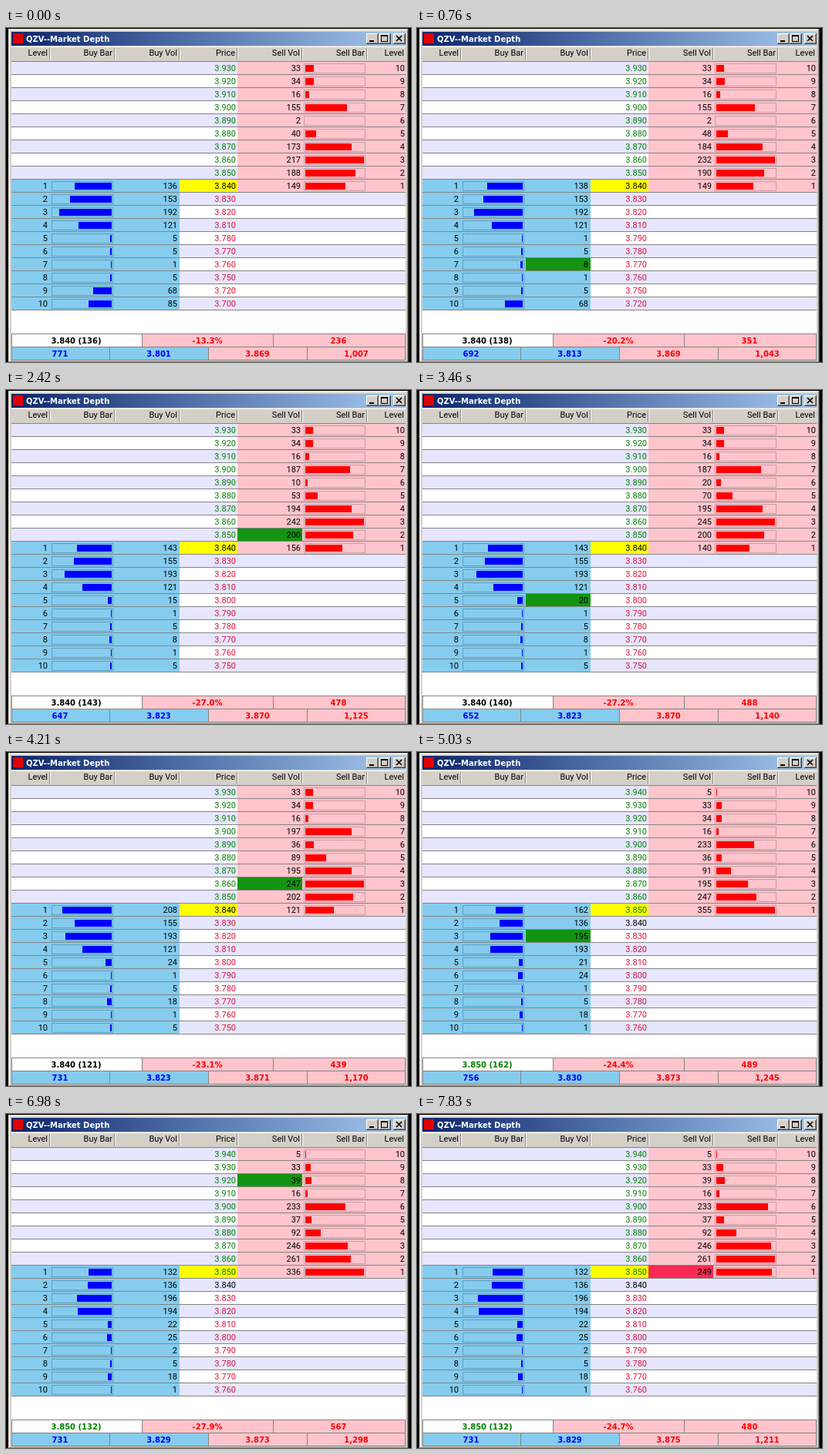
Recreate the animation shown at these times as an HTML page with a canvas. Size 525x434 px, loop 8 s.

```html
<!DOCTYPE html>
<html lang="en">
<head>
<meta charset="utf-8">
<title>Market Depth</title>
<style>
html, body { margin: 0; width: 100%; height: 100%; overflow: hidden; background: #000; }
canvas { display: block; }
</style>
</head>
<body>
<canvas id="stage" width="525" height="434"></canvas>
<script>
const ctx = document.getElementById('stage').getContext('2d');
const LOOP = 8000, FLASH = 460, LEVELS = 10, CLOSE = 384, BAR = 76;
const PINK = '#ffc4cc', SKY = '#85ccee', LAVENDER = '#e6e6ff', FACE = '#d4d0c8', RULE = '#848484';
const PLAIN = '11px Roboto, sans-serif';
const BOLD = 'bold 10px "DejaVu Sans", sans-serif';

// Prices are in cents; s = sell side, b = buy side.
const opening = { s: {}, b: {} };
[149, 188, 217, 173, 40, 2, 155, 16, 34, 33, 5].forEach((vol, i) => opening.s[384 + i] = vol);
[136, 153, 192, 121].forEach((vol, i) => opening.b[384 - i] = vol);
Object.assign(opening.b, { 378: 5, 377: 5, 376: 1, 375: 5, 372: 68, 370: 85 });

// Each burst spreads its steps evenly over a time span; "-" only clears the highlight.
const events = [];
function burst(from, to, steps) {
  const list = steps.split(' ');
  list.forEach((step, i) => events.push({
    time: from + (to - from) * i / Math.max(1, list.length - 1),
    orders: step === '-' ? [] : step.split(',').map(order => {
      const [key, vol] = order.split('=');
      return { side: key[0], price: +key.slice(1), vol: +vol };
    })
  }));
}
burst(60, 430, 's386=225 s387=184 s388=48 s385=190 b384=138 s386=232');
burst(630, 1010, 'b379=1 b377=8 s390=170 s384=151 s390=185');
burst(1210, 1460, 's389=10 b384=140 -');
burst(1590, 1970, 's386=242 s390=187 b380=15 s387=194 b384=143 s384=156');
burst(2100, 2100, 's388=53');
burst(2300, 2480, 'b382=193 b383=155 s385=200 s387=195');
burst(2680, 2940, 's388=70 s386=245 s384=140');
burst(3340, 4090, 's389=20 b380=20 s390=197 s388=89 b384=170 s389=36 b377=18 s385=202 b384=208 b380=24');
burst(4150, 4270, 's384=121 s386=247 s390=233');
burst(4360, 4840, 's388=91 b383=190 s384=0,b384=140,s385=340,b385=150 s385=355 b381=21 b385=162');
burst(4970, 5030, 'b384=136 b383=195');
burst(5490, 5550, 's385=365 s387=245');
burst(5880, 5880, 's385=380');
burst(6210, 6210, 'b383=196,b382=194,b381=22,b380=25,b379=2,s389=37,s388=92,s387=246,s386=248,s385=381');
burst(6470, 6590, 's386=261 s385=340 s385=336');
burst(6790, 7110, 'b385=132 s392=39 s385=300 s385=279');
burst(7830, 7830, 's385=249');

function bookAt(time) {
  const book = { s: { ...opening.s }, b: { ...opening.b } };
  let flash = null;
  for (const event of events) {
    if (event.time > time + 0.01) break;
    flash = null;
    for (const { side, price, vol } of event.orders) {
      const up = vol > (book[side][price] || 0);
      book[side][price] = vol;
      if (time < event.time + FLASH) flash = { side, price, color: up ? '#129412' : '#fa2a54' };
    }
  }
  const top = (side, dir) => Object.entries(book[side])
    .map(([price, vol]) => ({ price: +price, vol }))
    .filter(level => level.vol)
    .sort((a, b) => dir * (a.price - b.price))
    .slice(0, LEVELS);
  return { sells: top('s', 1), buys: top('b', -1), flash };
}

function box(x, y, w, h, color) {
  ctx.fillStyle = color;
  ctx.fillRect(x, y, w, h);
}
function outline(x, y, w, h, color) {
  ctx.strokeStyle = color;
  ctx.strokeRect(x + 0.5, y + 0.5, w - 1, h - 1);
}
function text(str, x, y, color = '#000', align = 'right', font = PLAIN) {
  ctx.font = font;
  ctx.textAlign = align;
  ctx.fillStyle = color;
  ctx.fillText(str, x, y);
}
const money = cents => (cents / 100).toFixed(3);
const priceColor = price => price > CLOSE ? '#008000' : price < CLOSE ? '#dc143c' : '#000';
const sum = (list, value) => list.reduce((total, item) => total + value(item), 0);

function drawButton(x) {
  box(x, 7, 16, 14, '#404040');
  box(x, 7, 15, 13, '#fff');
  box(x + 1, 8, 14, 12, RULE);
  box(x + 1, 8, 13, 11, FACE);
}

function drawWindow() {
  box(0, 0, 525, 434, '#000');
  box(3, 1, 519, 433, '#404040');
  box(3, 1, 518, 433, FACE);
  box(4, 2, 517, 432, RULE);
  box(4, 2, 516, 431, '#fff');
  box(5, 3, 515, 430, FACE);
  const title = ctx.createLinearGradient(7, 0, 518, 0);
  title.addColorStop(0, '#0a246a');
  title.addColorStop(1, '#a6caf0');
  box(7, 5, 511, 18, title);
  box(9, 7, 13, 13, '#e00000');
  text('QZV--Market Depth', 26, 18, '#fff', 'left', BOLD);

  [467, 483, 502].forEach(drawButton);
  box(471, 16, 6, 2, '#000');
  outline(486, 9, 9, 9, '#000');
  box(486, 9, 9, 2, '#000');
  ctx.strokeStyle = '#000';
  ctx.lineWidth = 1.6;
  ctx.beginPath();
  ctx.moveTo(506, 10); ctx.lineTo(513, 17);
  ctx.moveTo(513, 10); ctx.lineTo(506, 17);
  ctx.stroke();
  ctx.lineWidth = 1;

  box(7, 24, 511, 1, '#fff');
  [['Level', 57], ['Buy Bar', 141], ['Buy Vol', 225], ['Price', 300],
   ['Sell Vol', 384], ['Sell Bar', 468], ['Level', 519]].forEach(([label, edge]) => {
    text(label, edge - 3, 36);
    if (edge < 518) {
      box(edge - 1, 26, 1, 15, RULE);
      box(edge, 26, 1, 15, '#fff');
    }
  });
  box(7, 43, 511, 1, RULE);
  box(7, 44, 511, 353, '#fff');
}

function drawRow(row, { sells, buys, flash }, max) {
  const y = 44 + 17 * row, base = y + 12;
  const sell = sells[LEVELS - 1 - row], buy = buys[row - LEVELS + 1];
  const { price } = sell || buy;
  const lit = (side, x, w) => {
    if (flash && flash.side === side && flash.price === price) box(x, y, w, 16, flash.color);
  };
  box(7, y, 511, 16, row % 2 ? '#fff' : LAVENDER);
  if (buy) {
    box(7, y, 218, 16, SKY);
    lit('b', 141, 84);
    const w = Math.ceil(buy.vol / max * BAR);
    outline(59, y + 2, 80, 13, '#5c9fc4');
    box(137 - w, y + 4, w, 9, '#00f');
    text(row - LEVELS + 2, 54, base);
    text(buy.vol, 222, base);
  }
  if (sell) {
    box(300, y, 218, 16, PINK);
    lit('s', 300, 84);
    outline(386, y + 2, 80, 13, '#cf9aa2');
    box(388, y + 4, Math.floor(sell.vol / max * BAR), 9, '#f00');
    text(sell.vol, 382, base);
    text(LEVELS - row, 517, base);
  }
  if (buy && sell) box(225, y, 75, 16, '#ff0');
  text(money(price), 298, base, priceColor(price));
  box(7, y + 16, 511, 1, RULE);
}

function drawFooter({ sells, buys }) {
  const bought = sum(buys, l => l.vol), sold = sum(sells, l => l.vol);
  const average = (side, total) => money(sum(side, l => l.price * l.vol) / total);
  const price = buys[0].price;
  const matched = Math.min(buys[0].vol, sells[0].vol);
  const percent = (100 * (bought - sold) / (bought + sold)).toFixed(1) + '%';
  const cells = (y, width, list) => list.forEach(([label, color, fill], i) => {
    const x = 6 + width * i;
    box(x + 1, y + 1, 517 - x, 16, fill);
    if (i) box(x, y, 1, 17, RULE);
    text(label, x + width / 2, y + 13, color, 'center', BOLD);
  });
  cells(397, 170, [
    [`${money(price)} (${matched})`, priceColor(price), '#fff'],
    [percent, '#f00', PINK],
    [Math.abs(bought - sold).toLocaleString('en-US'), '#f00', PINK]
  ]);
  cells(414, 128, [
    [bought.toLocaleString('en-US'), '#00f', SKY],
    [average(buys, bought), '#00f', SKY],
    [average(sells, sold), '#f00', PINK],
    [sold.toLocaleString('en-US'), '#f00', PINK]
  ]);
  [397, 414, 431].forEach(y => box(7, y, 511, 1, RULE));
  box(7, 397, 1, 35, RULE);
  box(517, 397, 1, 35, RULE);
}

function draw(time) {
  const book = bookAt(time);
  const max = Math.max(...book.sells.concat(book.buys).map(l => l.vol));
  drawWindow();
  for (let row = 0; row < 2 * LEVELS - 1; row++) drawRow(row, book, max);
  drawFooter(book);
}

const start = performance.now();
function tick() {
  draw((performance.now() - start) % LOOP);
  requestAnimationFrame(tick);
}
tick();
</script>
</body>
</html>
```
